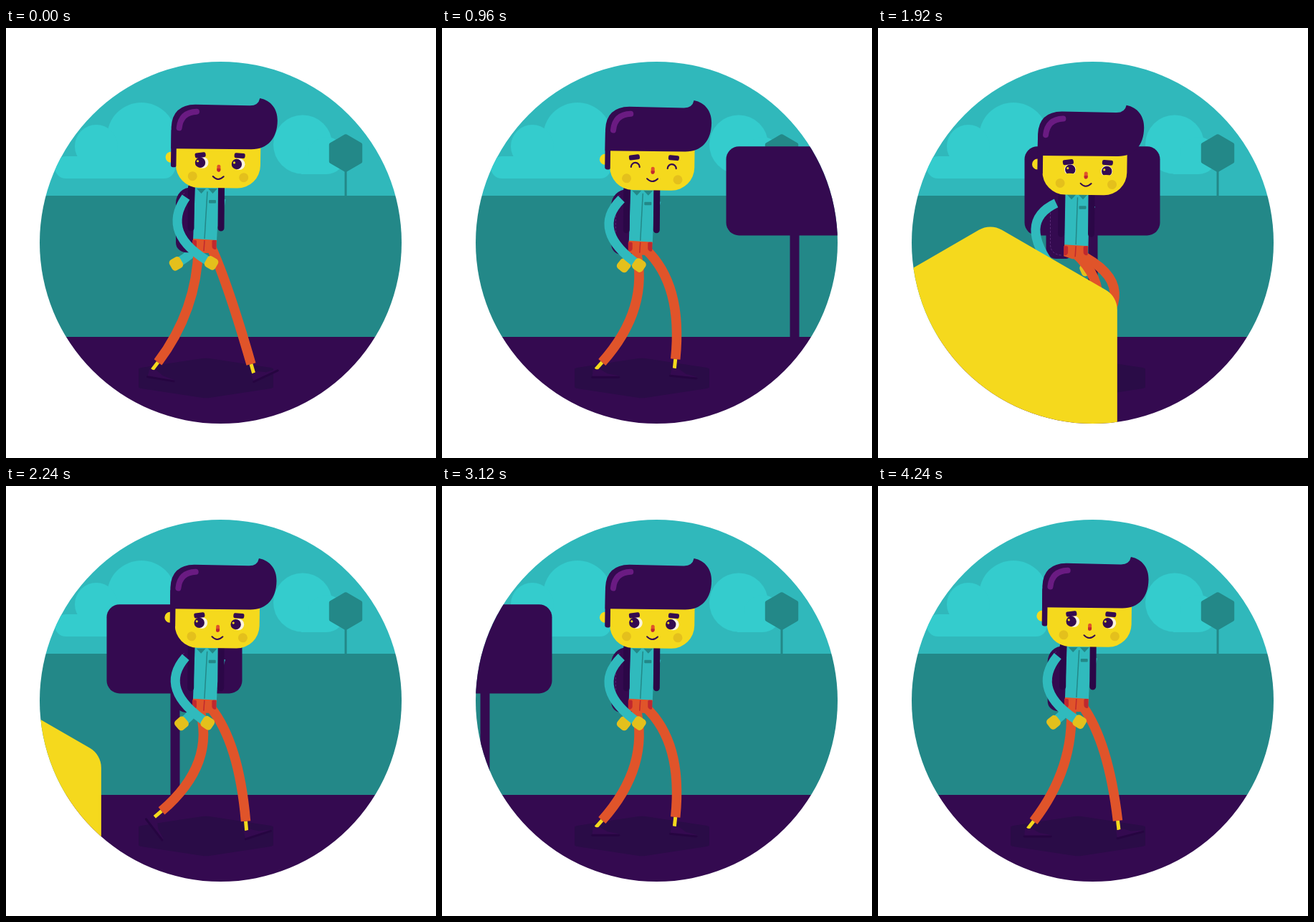
Recreate the animation shown at these times as an HTML page with a canvas. Size 600x600 px, loop 4320 ms.

```html
<!DOCTYPE html>
<html lang="en">
<head>
<meta charset="utf-8">
<title>Walk</title>
<style>
html, body { margin: 0; width: 100%; height: 100%; overflow: hidden; background: #fff; }
canvas { display: block; width: 600px; height: 600px; }
</style>
</head>
<body>
<canvas id="stage" width="600" height="600"></canvas>
<script>
const ctx = document.getElementById('stage').getContext('2d');
const LOOP = 4320, STEP = 80, CYCLE = 1080;
const { PI, cos, sin, max, min } = Math;
const RAD = PI / 180;

const C = {
  sky: '#30b8bb', cloud: '#34cccd', field: '#238888', dark: '#340a50',
  shadow: '#2a0c47', sole: '#260541', strap: '#2b0747', shine: '#6a1b82',
  skin: '#f5d91d', hand: '#e4c01c', shirt: '#30babd', seam: '#238888',
  pants: '#e0542a', pocket: '#c0282f', stitch: '#5a2a78', white: '#fbf3df'
};

function fill(color, draw) {
  ctx.fillStyle = color;
  ctx.beginPath();
  draw();
  ctx.fill();
}
function line(color, width, draw, cap = 'butt') {
  ctx.strokeStyle = color;
  ctx.lineWidth = width;
  ctx.lineCap = cap;
  ctx.beginPath();
  draw();
  ctx.stroke();
}
function path(...pts) {
  for (let i = 0; i < pts.length; i += 2) {
    if (i) ctx.lineTo(pts[i], pts[i + 1]); else ctx.moveTo(pts[0], pts[1]);
  }
}
const poly = (color, ...pts) => fill(color, () => path(...pts));
const disc = (color, x, y, r) => fill(color, () => ctx.arc(x, y, r, 0, 7));
const box = (color, x, y, w, h, r = 0) => fill(color, () => ctx.roundRect(x, y, w, h, r));

function placed(x, y, deg, draw) {
  ctx.save();
  ctx.translate(x, y);
  ctx.rotate(deg * RAD);
  draw();
  ctx.restore();
}

function hexagon(color, x, y, r, round, squash = 1) {
  ctx.save();
  ctx.translate(x, y);
  ctx.scale(1, squash);
  fill(color, () => {
    const corner = i => [r * sin(i * PI / 3), -r * cos(i * PI / 3)];
    const [ax, ay] = corner(5), [bx, by] = corner(0);
    ctx.moveTo((ax + bx) / 2, (ay + by) / 2);
    for (let i = 0; i < 6; i++) ctx.arcTo(...corner(i), ...corner(i + 1), round);
    ctx.closePath();
  });
  ctx.restore();
}

// Bent tube through a joint; returns the direction of its free end.
function limb(color, width, x0, y0, x, y, mx, my) {
  const cx = 2 * mx - (x0 + x) / 2, cy = 2 * my - (y0 + y) / 2;
  line(color, width, () => {
    ctx.moveTo(x0, y0);
    ctx.quadraticCurveTo(cx, cy, x, y);
  });
  return Math.atan2(y - cy, x - cx);
}

// One stride: heel strike at w = 0, toe off at w = PI, then swing.
function leg(w, hipX, hipY, shift) {
  const c = cos(w);
  const swing = max(0, cos(w - 253 * RAD)) ** 2;
  const hx = hipX + 9 * c;
  const x = 280 + 59 * c + 3 * cos(2 * w) + shift;
  const y = 469 - 6 * sin(w) ** 2 - 30 * swing;
  const bow = 26 - 21 * cos(2 * w + 10 * RAD) - 9 * sin(w + 60 * RAD);
  const a = limb(C.pants, 13.5, hx, hipY, x, y, (hx + x) / 2 + bow, (hipY + y) / 2 - 6 - 10 * c);

  const ex = x + 13 * cos(a), ey = y + 13 * sin(a);
  line(C.skin, 5, () => path(x, y, ex, ey));
  placed(ex, ey, 110 * swing - 25 * max(0, c) ** 3, () => {
    poly(C.dark, -5, 11, -4, 0, 6, 0, 16, 6, 32, 9, 32, 11);
    line(C.sole, 3, () => path(-5, 11, 32, 11), 'round');
  });
}

function arm(sx, sy, x, y, mx, my) {
  const a = limb(C.shirt, 13, sx, sy, x, y, mx, my);
  placed(x, y, a / RAD, () => box(C.hand, -9, -8.5, 17, 17, 5));
}

function scenery() {
  box(C.sky, 0, 0, 600, 234);
  disc(C.cloud, 189, 152, 48);
  disc(C.cloud, 126, 165, 30);
  box(C.cloud, 68, 179, 168, 31, 15.5);
  disc(C.cloud, 414, 162.5, 41);
  disc(C.cloud, 447, 178, 26);
  box(C.cloud, 412, 178, 35, 26);
  box(C.field, 0, 234, 600, 197);
  box(C.field, 472.5, 195, 3, 40);
  hexagon(C.field, 474, 174.5, 26.8, 3);
  box(C.dark, 0, 431, 600, 170);
}

function sign(x) {
  box(C.dark, x, 165.2, 189, 124.2, 18);
  box(C.dark, x + 89, 285, 13, 147);
}

function torso(x, y) {
  const b = x * 0.35;
  poly(C.shirt, 264 + x, 220 + y, 298 + x, 220 + y, 294 + b, 297 + y, 261 + b, 297 + y);
  line(C.seam, 1.5, () => path(281 + x, 228 + y, 277 + b, 294 + y));
  for (const cx of [272.5, 288.5]) {
    poly(C.seam, cx - 6.5 + x, 224 + y, cx + 6.5 + x, 224 + y, cx + x, 231 + y);
  }
  box(C.seam, 283 + x, 240 + y, 10, 4.5, 1);
  poly(C.pants, 261 + b, 294 + y, 294 + b, 296 + y, 293 + b, 310 + y, 283 + b, 314 + y,
    272 + b, 314 + y, 260 + b, 310 + y);
  line(C.pocket, 1.5, () => path(277 + b, 296 + y, 276 + b, 311 + y));
  box(C.pocket, 260 + b, 296 + y, 6, 13, [0, 2, 5, 2]);
  box(C.pocket, 287.5 + b, 296 + y, 6, 13, [2, 0, 2, 5]);
  for (const sx of [258.5, 300.5]) {
    line(C.strap, 9, () => path(sx + x, 222 + y, sx - 0.5 + x, 279 + y), 'round');
  }
}

function backpack(x, y) {
  box(C.dark, x, y, 34, 91, [22, 6, 6, 14]);
  ctx.setLineDash([3, 2]);
  line(C.stitch, 1, () => {
    ctx.moveTo(x + 12, y + 8);
    ctx.quadraticCurveTo(x + 6, y + 14, x + 6, y + 30);
    ctx.lineTo(x + 6, y + 72);
    ctx.quadraticCurveTo(x + 7, y + 85, x + 22, y + 86);
  });
  ctx.setLineDash([]);
}

function eye(x, y, turn, closed) {
  if (closed) {
    line(C.dark, 2.2, () => ctx.arc(x - 2, y + 3, 6, PI, 0), 'round');
    return;
  }
  const px = x - 3.5 + 8 * turn;
  disc(C.white, x + 2 * turn, y, 8);
  disc(C.dark, px, y, 7.2);
  disc(C.skin, px - 3.5, y - 2, 1.6);
  if (turn > 0.1) {
    fill(C.skin, () => ctx.ellipse(px - 1, y + 9, 11, 6.5 * turn, 0, 0, 7));
  }
}

function head(x, y, tilt, turn, closed) {
  placed(x, y, tilt, () => {
    disc(C.skin, -66, -42, 7.5);
    box(C.skin, -59, -90, 118, 90, [0, 0, 32, 32]);
    box(C.dark, -66, -80, 7.5, 52, [0, 0, 2, 3]);
    fill(C.dark, () => {
      ctx.moveTo(-66, -54);
      ctx.lineTo(-66, -84);
      ctx.quadraticCurveTo(-65, -115, -33, -116);
      ctx.lineTo(42, -115.5);
      ctx.quadraticCurveTo(55, -115, 57, -126);
      ctx.bezierCurveTo(73, -123, 82, -111, 82, -95);
      ctx.bezierCurveTo(82, -70, 69, -55, 46, -54.5);
      ctx.closePath();
    });
    line(C.shine, 8, () => {
      ctx.moveTo(-55, -83);
      ctx.quadraticCurveTo(-53, -105, -31, -106);
    }, 'round');

    eye(-21.5, -35, turn, closed);
    eye(29.5, -33.5, turn, closed);
    placed(-25 + 3 * turn, -45.5, -8, () => box(C.dark, -7.5, -3.5, 15, 7, 2.5));
    placed(30 + 3 * turn, -45.5, 4, () => box(C.dark, -7.5, -3.5, 15, 7, 2.5));

    disc(C.hand, -35.5 + 2.5 * turn, -16, 6.5);
    disc(C.hand, 36 + 4 * turn, -15, 6.5);
    const nx = 1 + 1.5 * turn;
    box(C.pants, nx - 2.5, -32.5, 5, 10, 2.5);
    box(C.pocket, nx - 2.5, -27, 5, 4.5, [0, 0, 2.5, 2.5]);
    line(C.dark, 2, () => {
      const mx = 2.5 * turn;
      ctx.moveTo(mx - 7, -16);
      ctx.quadraticCurveTo(mx, -8.5, mx + 8, -16);
    }, 'round');
  });
}

function walker(t) {
  const w = 2 * PI * t / CYCLE;
  const c = cos(w), c2 = cos(2 * w);
  const bob = 4.5 * (1 - cos(2 * w + 13 * RAD));
  const back = max(0, -c);
  const tx = 3 * c - 3;
  const hipX = 277.5 + tx * 0.35, hipY = 306 + bob;
  const turn = min(1, max(0, 0.8 - 1.1 * c));

  hexagon(C.shadow, 279, 488.5, 108.5, 10, 0.26);
  arm(300 + tx, 238 + bob, 297 - 56 * c - 4 * c2, 329 + bob, 290 - 15 * c + 5 * c2, 291);
  backpack(237 + tx, 222 + bob * 1.1);
  leg(w, hipX, hipY, 0);
  leg(w + PI, hipX, hipY, -12);
  torso(tx, bob);
  arm(251 + tx, 236 + bob, 237 + 50 * c, 330.5 - 2.5 * c + bob, 222 + 15 * c + 5 * c2, 280 + 5 * c);
  head(289 + 4.5 * c + 2 * c2, 223 + 1.2 * bob - 3 * back, 0.8 - 12 * back, turn,
    t >= 880 && t < 1040);
}

function draw(t) {
  ctx.clearRect(0, 0, 600, 600);
  ctx.save();
  ctx.beginPath();
  ctx.arc(299.5, 299.5, 252.5, 0, 7);
  ctx.clip();
  scenery();
  sign(588.5 - 0.2 * t);
  walker(t);
  hexagon(C.skin, 408 - 0.628 * (t - 1520), 477, 204.4, 32);
  ctx.restore();
}

const start = performance.now();
function tick() {
  const t = (performance.now() - start) % LOOP;
  draw(Math.floor(t / STEP) * STEP);
  requestAnimationFrame(tick);
}
tick();
</script>
</body>
</html>
```
